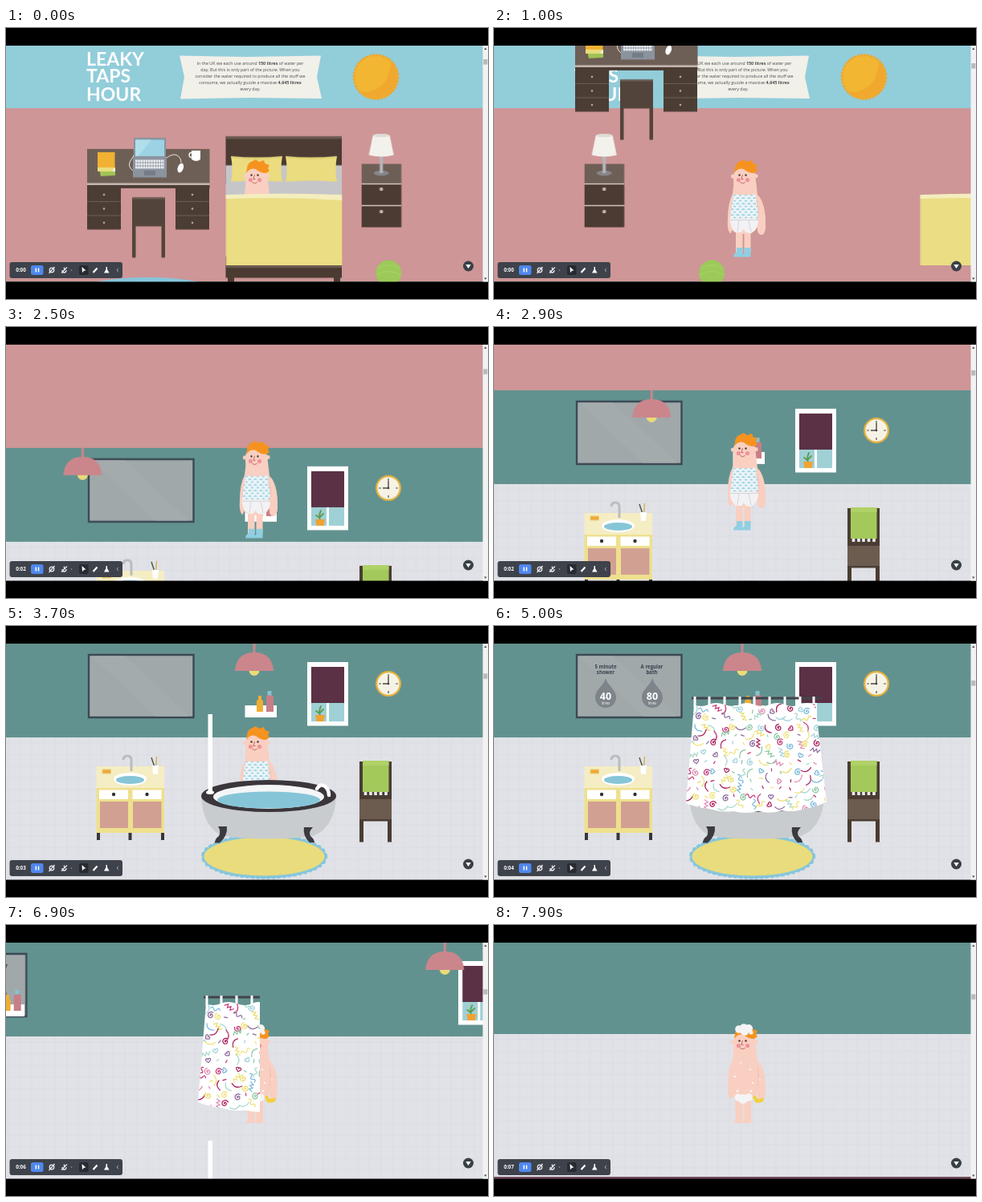
An HTML page that plays this animation: 600x338 px, repeating every 8000 ms.

```html
<!DOCTYPE html>
<html lang="en">
<head>
<meta charset="utf-8">
<title>Water at home</title>
<style>
html, body { margin: 0; width: 100%; height: 100%; overflow: hidden; background: #000; }
svg { display: block; }
#stage { width: 100vw; height: 100vh; }
text { font-family: "Open Sans", "Noto Sans", sans-serif; }
.title text { font-family: Lato, sans-serif; }
.move { animation: 8s linear infinite; }
.b { font-weight: 700; }

.world { animation-name: world; }
@keyframes world {
  0%, 18.1% { transform: none; }
  25% { transform: translateY(-75px); }
  36.25% { transform: translateY(-237px); }
  44%, 92% { transform: translateY(-294px); }
  98.75%, 100% { transform: translateY(-297px); }
}
.desk { animation-name: desk; }
@keyframes desk {
  0% { transform: none; }
  12.5% { transform: translateY(-147px); }
  25%, 100% { transform: translateY(-300px); }
}
.bedside { animation-name: bedside; }
@keyframes bedside {
  0% { transform: none; }
  12.5% { transform: translateX(-330px); }
  18.75%, 100% { transform: translateX(-500px); }
}
.ball { animation-name: ball; }
@keyframes ball {
  0% { transform: none; }
  12.5% { transform: translateX(-205px); }
  23%, 100% { transform: translateX(-520px); }
}
.rug { animation-name: rug; }
@keyframes rug { 0% { transform: none; } 5%, 100% { transform: translateY(20px); } }
.head { animation-name: head; }
@keyframes head { 0% { transform: none; } 12.5%, 100% { transform: translateY(-205px); } }
.foot { animation-name: foot; }
@keyframes foot { 0% { transform: none; } 6%, 100% { transform: translateY(60px); } }
.quilt { animation-name: quilt; }
@keyframes quilt {
  0% { transform: none; }
  12.5% { transform: translateX(257px); }
  16%, 100% { transform: translateX(330px); }
}
.man { animation-name: man; }
@keyframes man {
  0%, 18% { transform: none; }
  25% { transform: translateY(-10px); }
  36.25% { transform: translateY(-32px); }
  41%, 100% { transform: translateY(-39px); }
}
.dry { animation-name: dry; }
@keyframes dry { 0%, 62.4% { opacity: 1; } 62.5%, 100% { opacity: 0; } }
.wet { animation-name: wet; }
@keyframes wet { 0%, 62.4% { opacity: 0; } 62.5%, 100% { opacity: 1; } }

.slide { animation-name: slide; }
@keyframes slide {
  0%, 71.875% { transform: none; }
  80% { transform: translateX(var(--dx)); }
  90%, 100% { transform: translateX(calc(var(--dx) * 2.6)); }
}
.pendant { animation-name: pendant; }
@keyframes pendant {
  0%, 25% { transform: translateX(-340px); }
  36.25% { transform: translateX(-113px); }
  45%, 71.875% { transform: none; }
  80% { transform: translateX(107px); }
  90%, 100% { transform: translateX(315px); }
}
.hand { animation-name: hand; transform-origin: 476px 72px; }
@keyframes hand { 0%, 71.875% { transform: none; } 80%, 100% { transform: rotate(35deg); } }
.mat { animation-name: mat; }
@keyframes mat {
  0%, 71.875% { transform: none; }
  80% { transform: translateY(-170px); }
  87%, 100% { transform: translateY(-310px); }
}
.facts { animation-name: facts; }
@keyframes facts { 0%, 55% { opacity: 0; } 60%, 100% { opacity: 1; } }
.tub { animation-name: tub; }
@keyframes tub {
  0%, 37% { transform: translateY(220px); }
  46%, 71.875% { transform: none; }
  80% { transform: translateY(79px); }
  91%, 100% { transform: translateY(220px); }
}
.reveal { animation-name: reveal; transform-origin: 235px 0; }
@keyframes reveal {
  0%, 46.25% { transform: scaleX(0); }
  56.25%, 71.875% { transform: scaleX(1); }
  80% { transform: scaleX(.739); }
  96%, 100% { transform: scaleX(0); }
}
.thumb { animation-name: thumb; }
@keyframes thumb {
  0% { transform: none; }
  12.5% { transform: translateY(5px); }
  25% { transform: translateY(11.5px); }
  36.25% { transform: translateY(15px); }
  62.5% { transform: translateY(29px); }
  80% { transform: translateY(38px); }
  100% { transform: translateY(48px); }
}
.timer { animation-name: timer; animation-timing-function: step-end; }
@keyframes timer {
  0% { transform: none; }
  16.25% { transform: translateY(-12px); }
  28.75% { transform: translateY(-24px); }
  41.25% { transform: translateY(-36px); }
  53.75% { transform: translateY(-48px); }
  66.25% { transform: translateY(-60px); }
  78.75% { transform: translateY(-72px); }
  91.25%, 100% { transform: translateY(-84px); }
}
</style>
</head>
<body>
<svg id="stage" viewBox="0 0 600 338" preserveAspectRatio="none">
<defs>
  <pattern id="tiles" width="14.5" height="14.5" patternUnits="userSpaceOnUse">
    <path fill="#e1e2e7" d="M0 0h14.5v14.5H0z"/>
    <path d="M3 0v14.5M0 5h14.5" stroke="#d8dae0" stroke-width=".7"/>
  </pattern>
  <pattern id="clouds" width="7" height="7" patternUnits="userSpaceOnUse">
    <path fill="#eaf3f6" d="M0 0h7v7H0z"/>
    <path d="M.5 2.5q1.8-2.4 3.8 0zM4 6q1.5-2.4 3 0z" fill="#8fcfe4" stroke="#8fcfe4" stroke-width=".6"/>
  </pattern>
  <clipPath id="open"><rect class="move reveal" x="235" y="80" width="180" height="160"/></clipPath>
  <clipPath id="cloth"><path id="sheet" d="M249 98Q258 102 267 98T287 98T306 98T324 98T343 98T362 98T381 98T400 98L414 219Q402 226 390 227Q374 233 358 230Q345 235 329 231Q313 235 298 231Q283 233 268 228Q254 227 239 221Z"/></clipPath>
  <g id="pillow">
    <path d="M280 160Q312 163 344 160Q341 176 344 192Q312 189 280 192Q283 176 280 160Z" fill="#eadc7f"/>
    <path d="M282 162Q312 165 342 162" fill="none" stroke="#d8c96d" stroke-width=".8"/>
  </g>
  <g id="drawers">
    <path fill="#4b3d34" d="M101 199h42v52.5h-42z"/>
    <path d="M101 216.5h42M101 234h42" stroke="#7a6a60" stroke-width=".8"/>
    <g fill="#b9aaa0"><circle cx="122" cy="208" r="1.3"/><circle cx="122" cy="225.5" r="1.3"/><circle cx="122" cy="243" r="1.3"/></g>
  </g>
  <path id="drop" d="M139 65C141 74 152 79 152 89A13 13 0 0 1 126 89C126 79 137 74 139 65Z" fill="#7d848a"/>
</defs>

<path fill="#ce9697" d="M0 0h600v338H0z"/>

<g class="move world">
  <path fill="#ce9697" d="M0 100h600v216H0z"/>
  <path fill="#92cdda" d="M0 0h600v100H0z"/>
  <path fill="#62928f" d="M0 316h600v118H0z"/>
  <path fill="url(#tiles)" d="M0 433h600v178H0z"/>
  <path fill="#714a5b" d="M0 611h600v30H0z"/>

  <g class="title" fill="#fff" font-size="23" font-weight="700">
    <text x="100" y="46.5">LEAKY</text>
    <text x="100" y="68">TAPS</text>
    <text x="100" y="90.5">HOUR</text>
  </g>
  <path fill="#f1f0e9" d="M216 34.5L300 36L392 34.5L387 61L393 88L304 87L217 88.5L222 61Z"/>
  <g font-size="5.4" fill="#4b4b50" text-anchor="middle">
    <text x="304" y="46">In the UK we each use around <tspan class="b">150 litres</tspan> of water per</text>
    <text x="304" y="54">day. But this is only part of the picture. When you</text>
    <text x="304" y="62">consider the water required to produce all the stuff we</text>
    <text x="304" y="70.2">consume, we actually guzzle a massive <tspan class="b">4,645 litres</tspan></text>
    <text x="304" y="78.3">every day.</text>
  </g>
  <circle cx="460.5" cy="61" r="27.5" fill="#f2b632" stroke="#eea62c" stroke-width="2.6" stroke-dasharray="3 1.3"/>
  <path d="M479 41A27 27 0 0 1 441 80Q477 81 479 41Z" fill="#f0a92e"/>

  <g transform="translate(0 294)">
    <g class="move slide" style="--dx:-104px">
      <path fill="#a0a8aa" stroke="#3b4a55" stroke-width="2.4" d="M103 36h130.5v78H103z"/>
      <path fill="#a9b0b1" d="M106 37h42l80 76h-42z" opacity=".5"/>
      <g class="move facts" text-anchor="middle">
        <g fill="#37444f" font-size="6.1" font-weight="700">
          <text x="139" y="52.5">5 minute</text><text x="139" y="60">shower</text>
          <text x="196.5" y="52.5">A regular</text><text x="196.5" y="60">bath</text>
        </g>
        <use href="#drop"/><use href="#drop" x="58"/>
        <g fill="#fff" class="b" font-size="12.5"><text x="139" y="92">40</text><text x="197" y="92">80</text></g>
        <g fill="#fff" font-size="4.6"><text x="139" y="97.5">litres</text><text x="197" y="97.5">litres</text></g>
      </g>
    </g>

    <g class="move slide" style="--dx:94px">
      <path fill="#fff" d="M375 45h51v79.5h-51z"/>
      <path fill="#9fd0d6" d="M380 51h41v68h-41z"/>
      <path fill="#fff" d="M399 96h3v23h-3z"/>
      <path fill="#5a3145" d="M380 51h41v45h-41z"/>
      <path d="M391 112q-2-6 1-12M390 109l-4-3M391 108l4-4" fill="none" stroke="#5d9b4c" stroke-width="1.8" stroke-linecap="round"/>
      <path fill="#f0a232" d="M385 111h12l-1.5 8h-9z"/>
    </g>

    <g class="move slide" style="--dx:103px">
      <circle cx="476" cy="72" r="14.8" fill="#f6f3e6" stroke="#e5b23e" stroke-width="2.3"/>
      <path d="M476 60v3M476 81v3M464 72h3M485 72h3" stroke="#55504a" stroke-width="1.2"/>
      <path d="M476 72h-7" stroke="#3f3c3a" stroke-width="1.4"/>
      <path class="move hand" d="M476 72v-9" stroke="#3f3c3a" stroke-width="1.3"/>
      <circle cx="476" cy="72" r="1.3" fill="#3f3c3a"/>
    </g>

    <g class="move slide" style="--dx:-157px">
      <path fill="#fff" d="M297.5 99H337v15h-39.5z"/>
      <path fill="#f2ad31" d="M312 93q4-3 8 0v14h-8z"/><path fill="#f2ad31" d="M314 87h4v5h-4z"/>
      <path fill="#c77f86" d="M324 89q0-3 3-3h3q3 0 3 3v18h-9z"/><path fill="#86c2d0" d="M325.5 81h5v5.5h-5z"/>
    </g>

    <g class="move pendant">
      <circle cx="309" cy="55.5" r="6.5" fill="#eadb78"/>
      <path fill="#cb868c" d="M307.5 22h3v11q21 1 22.500 23h-48q1.500-22 22.500-23z"/>
    </g>

    <g class="move slide" style="--dx:-107px">
      <path fill="#f5edc3" d="M112.5 175h84.5v27h-84.5z"/>
      <path fill="#eee08e" d="M112.5 202h84.5v56h-84.5z"/>
      <path fill="#f0a83a" stroke="#e6cf78" d="M120 179h10.5v5h-10.5z"/>
      <ellipse cx="154.500" cy="191" rx="20.500" ry="8" fill="#fff"/>
      <ellipse cx="154.500" cy="192" rx="17.500" ry="5" fill="#86c5d8"/>
      <path d="M156 181V167q0-5-5-5t-5 5" fill="none" stroke="#b9bcc0" stroke-width="3"/>
      <path d="M185 176l-4-12" stroke="#4b5a44" stroke-width="1.5"/>
      <path d="M186.500 176l1-13" stroke="#d2b04a" stroke-width="1.4"/>
      <path fill="#fff" d="M182 174h8l-1 11h-6z"/>
      <path fill="#fff" d="M116 204.5h36v11.5h-36zM157.5 204.5h36v11.5h-36z"/>
      <path fill="#d2a093" d="M117 219h35v33h-35zM158 219h35.5v33H158z"/>
      <circle cx="134" cy="210" r="2.2" fill="#333"/><circle cx="175.5" cy="210" r="2.2" fill="#333"/>
      <path fill="#37363a" d="M113 258h4v9h-4zM152.5 258h4v9h-4zM193 258h4v9h-4z"/>
    </g>

    <g class="move slide" style="--dx:107px">
      <path fill="#4a3c33" d="M440 169h40v100.500h-5v-26h-30v26h-5z"/>
      <path d="M447.500 206v5M454 206v5M460 206v5M466.500 206v5M473 206v5" stroke="#eceded" stroke-width="3.600"/>
      <path fill="#6c5c50" d="M440 216h40v25h-40z"/>
      <path fill="#a3c95a" d="M444 168h32.5v39H444z"/><path fill="#b0d166" d="M444 168h32.5v6H444z"/>
    </g>

    <g class="move mat">
      <ellipse cx="321.5" cy="287.500" rx="75" ry="24.5" fill="none" stroke="#86c6dc" stroke-width="7.500" stroke-dasharray="0 6.500" stroke-linecap="round"/>
      <ellipse cx="321.5" cy="287.500" rx="75" ry="24" fill="#e9dc7d"/>
    </g>
  </g>
</g>

<ellipse class="move rug" cx="176" cy="328" rx="84" ry="17" fill="#86c6dc"/>

<g class="move head">
  <path fill="#4b3b33" d="M273.5 135.5H418V195H273.5z"/>
  <path fill="#6d5c52" d="M273.5 135.5H418v3H273.5z"/>
  <path fill="#c6c6c9" d="M273.5 171.5H418V212H273.5z"/>
  <use href="#pillow"/><use href="#pillow" x="68"/>
</g>
<g class="move foot">
  <path fill="#4b3b33" d="M273.5 285H418v26.5H273.5zM276 311h8v10h-8zM408 311h8v10h-8z"/>
  <path fill="#6d5c52" d="M273.5 296H418v3H273.5z"/>
</g>

<g class="move desk">
  <path fill="#6e5f56" d="M101 151h152.5v43H101z"/>
  <path fill="#4b3d34" d="M101 196h152.5v4H101z"/>
  <path fill="#c9bcb4" d="M101 193.5h152.5v2.5H101z"/>
  <use href="#drawers"/><use href="#drawers" x="110"/>
  <path fill="#53443b" d="M157 211.5h41v36h-41zM157 247h4.5v39.5H157zM193.5 247h4.5v39.5h-4.5z"/>
  <path d="M157 212.5h41" stroke="#6e5f56" stroke-width="2"/>
  <path fill="#a0c455" d="M116 176l20-1v9l-18 1z"/><path fill="#f4f0dd" d="M114 174h22v5h-22z"/>
  <path fill="#f1b133" d="M114 155h21.5v20H114z"/><path fill="#e9dc7d" d="M114 174h21l-3 5h-18z"/>
  <path d="M158 178q-8-6-2-14t3-12M200 162q8-6 13-3t5 9" fill="none" stroke="#f1e9dc" stroke-width="1"/>
  <path fill="#8b939f" d="M159 137h40v25h-40z"/><path fill="#9bd3e4" d="M161 139.5h36v20.5h-36z"/>
  <path fill="#b0dfeb" d="M161 139.5h20l-16 20.5h-4z"/>
  <path fill="#8b939f" d="M158 161h42v25.5h-42z"/>
  <path d="M161 166h36M161 170h36M161 174h36" stroke="#f0f2f5" stroke-width="3" stroke-dasharray="2.6 .6"/>
  <path fill="#757d89" d="M172 178h14v6h-14z"/>
  <ellipse cx="217.5" cy="174.5" rx="3.5" ry="6" fill="#fff" transform="rotate(20 217 174)"/>
  <path fill="#fff" d="M231 153h11v11q-5 4-11 0z"/><circle cx="231" cy="158.5" r="3" fill="none" stroke="#fff" stroke-width="1.3"/>
</g>

<g class="move ball">
  <circle cx="476.5" cy="305.5" r="16" fill="#9bca59"/>
  <path d="M463 300q13-9 27 0M462 308q14-9 29 0" fill="none" stroke="#a5d064" stroke-width="1.5"/>
</g>

<g class="move bedside">
  <path fill="#6e5f56" d="M443 169.5h49.5V194H443z"/>
  <path fill="#4b3b33" d="M443 194h49.5v54.5H443z"/>
  <path d="M443 194.5h49.5M443 221.5h49.5" stroke="#cfc3bb" stroke-width="1.3"/>
  <circle cx="467.5" cy="201" r="2.3" fill="#c3b5ab"/><circle cx="467.5" cy="229" r="2.3" fill="#c3b5ab"/>
  <ellipse cx="467.5" cy="181" rx="9.5" ry="3.2" fill="#85868a"/>
  <path fill="#b4b6b9" d="M465.5 158h4v23h-4z"/>
  <path fill="#f3f1ec" d="M457 134q10-4 21 0l5 24.5q-15 4-31 0z"/>
  <ellipse cx="467.5" cy="134" rx="10.5" ry="2" fill="#dedbd5"/>
</g>

<g class="move man">
  <g fill="#f9cfc1">
    <circle cx="297.5" cy="185" r="2.6"/><circle cx="326" cy="184.5" r="2.6"/>
    <path d="M301 250h8.5v30H301zM311.5 250h8v30h-8z"/>
    <path d="M298 184Q299 173 312 173Q325 173 325.5 186L328 208Q338 217 338 245Q338 258 332.5 258Q327 257 328 248Q324 257 312 257Q300 257 296 252Q295 258 293 255Q290 250 291 238Q291 218 297 207Q299 196 298 184Z"/>
  </g>
  <g class="move dry">
    <path fill="url(#clouds)" d="M298 207.5Q312 209 325.5 207.5L330 237.5H294z"/>
    <path fill="#f2f2f4" d="M293.5 237.5H330Q329 251 320 256L313 255L311 251L308 255L301 255Q294 250 293.5 237.5Z"/>
    <path d="M294 239.5h35.5M305 240l-2 14M317 240l3 14" stroke="#cdced4" stroke-width=".8" fill="none"/>
    <path fill="#f9cfc1" d="M326 208Q338 217 338 245Q338 258 332.5 258Q327 257 328.5 246Q331 228 326 208Z"/>
    <path fill="#8fcfe4" d="M302 274h7.5v11.5H298q0-4 4-6zM311.5 274h8v11.5H309q0-4 3-5z"/>
  </g>
  <path fill="#f6931f" d="M299 181L300.5 172L303 168L307 166L311 164L315 167L321 165L322.5 169L328 171L326 175L328 178L324 181Q316 181 311 176Q304 174 299 181Z"/>
  <path d="M328 240Q331 228 327.5 216" fill="none" stroke="#efb9ab" stroke-width=".7"/>
  <circle cx="304.5" cy="189.5" r="2.6" fill="#f0929a"/><circle cx="315.5" cy="189.5" r="2.6" fill="#f0929a"/>
  <circle cx="305.5" cy="183.5" r="1.2" fill="#4a3832"/><circle cx="313.5" cy="183.5" r="1.2" fill="#4a3832"/>
  <path d="M309.5 183l-1.5 5.5h2.5M306.500 192.5q3 2.5 6 0" fill="none" stroke="#c06a5c" stroke-width="1"/>
  <g class="move wet" fill="#f4f4f6">
    <circle cx="305" cy="169" r="4.8"/><circle cx="311" cy="167" r="4.8"/><circle cx="317" cy="168" r="5"/><circle cx="312" cy="172" r="5"/>
    <circle cx="320" cy="173" r="2.6"/>
    <path fill="#f9cfc1" d="M300 256h9.5v30H299q0-3 2-4zM311.5 256h8.5v30h-10q0-3 1.500-4z"/>
    <circle cx="304" cy="254" r="4.5"/><circle cx="310" cy="256" r="6"/><circle cx="317" cy="254" r="4.8"/>
    <g><circle cx="300" cy="228" r="1.3"/><circle cx="319" cy="219" r="1.2"/><circle cx="322" cy="236" r="1.3"/><circle cx="303" cy="246" r="1.6"/><circle cx="331" cy="232" r="1"/><circle cx="307" cy="211" r="1"/><circle cx="320" cy="246" r="1.5"/></g>
    <path fill="#f1cf3d" d="M322 254q3-2 4 1q5 2 9-1q2 6-4 6.500q-8 1-7-4z"/><circle cx="324.5" cy="254" r="2.3" fill="#f1cf3d"/>
  </g>
</g>

<g class="move quilt">
  <path fill="#eadd84" d="M273.5 209H418v87H273.5z"/>
  <path fill="#f4edbd" d="M273.5 208Q346 205 418 208V215Q346 210 273.5 213Z"/>
</g>

<g class="move tub">
  <path fill="#c9ccce" d="M243 212H411Q409 252 382 262Q327 269 270 262Q245 252 243 212Z"/>
  <path fill="#3a3a40" d="M264 250H275Q276 262 266 270.500H260Q260 265 265 262Q268 256 264 250ZM371 251H382Q376 257 379 262Q384 266 384 270H378Q369 262 371 251Z"/>
  <ellipse cx="327" cy="212" rx="84" ry="20" fill="#3a363b"/>
  <ellipse cx="327" cy="213" rx="69" ry="15" fill="#f4f5f6"/>
  <ellipse cx="327" cy="217" rx="64" ry="10.5" fill="#86c5d8"/>
  <path d="M387 203q4-7 10-3q5 4 5 11" fill="none" stroke="#fff" stroke-width="4.5" stroke-linecap="round"/>
  <path fill="#fff" d="M251.5 110h5.5v98h-5.5z"/><ellipse cx="254" cy="207.5" rx="5" ry="2.5" fill="#fff"/>
</g>

<g clip-path="url(#open)">
  <path fill="#43454c" d="M246 88.5h162v3H246z"/>
  <use href="#sheet" fill="#fff"/>
  <path d="M250 88v13M268 88v13M287 88v13M306 88v13M324 88v13M343 88v13M362 88v13M381 88v13M398 88v13" stroke="#fff" stroke-width="3"/>
  <g id="print" clip-path="url(#cloth)" fill="none" stroke-width="1.25" stroke-linecap="round"></g>
</g>

<path d="M0 0h600v22H0zM0 316.5h600V338H0z"/>
<path fill="#f2f2f2" d="M593.5 22h6.5v294.5h-6.5z"/>
<path fill="#555" d="M595 27l1.8-2.5 1.8 2.5zM595 311.5l1.8 2.5 1.8-2.5z"/>
<path class="move thumb" fill="#b9b9bb" d="M594.3 39h5v6.5h-5z"/>

<rect x="4.5" y="292" width="140.5" height="20" rx="3" fill="#3e424a"/>
<svg x="8" y="296" width="22" height="12" overflow="hidden"><g id="clock" class="move timer" fill="#fff" font-size="6.3" font-weight="700" text-anchor="middle"></g></svg>
<rect x="31" y="296" width="15.5" height="12" rx="2.5" fill="#4f87ee"/>
<path d="M37.3 299.5v5M40.5 299.5v5" stroke="#fff" stroke-width="1.5"/>
<g fill="none" stroke="#e6e7ea" stroke-width="1.3">
  <circle cx="57" cy="302" r="2.8"/><path d="M53.5 306l7-8"/>
  <path d="M72.5 298.5v4M70 302q0 3 2.5 3t2.5-3M69 305.5l7-7"/>
</g>
<circle cx="81.5" cy="302" r=".8" fill="#999da5"/>
<rect x="91" y="296" width="11.5" height="12" rx="2" fill="#272a30"/>
<path fill="#fff" d="M94.5 298l5 4.5-2.5.3-2 2.4z"/>
<path d="M108.5 305l5-5.5" stroke="#fff" stroke-width="2.2"/>
<path fill="#fff" d="M124.5 298h1.5v3l2.5 4.5h-6.5l2.5-4.5z"/>
<path d="M140 299.8l-2 2.2 2 2.2" fill="none" stroke="#a6a9b0"/>
<circle cx="575.5" cy="297" r="6.5" fill="#3a3f47"/>
<path fill="#fff" d="M572.3 295h6.4l-3.2 5z"/>
</svg>
<script>
const NS = 'http://www.w3.org/2000/svg';

function add(parent, tag, attrs) {
  const el = document.createElementNS(NS, tag);
  for (const key in attrs) el.setAttribute(key, attrs[key]);
  return parent.appendChild(el);
}

const clock = document.getElementById('clock');
for (let s = 0; s < 8; s++) add(clock, 'text', { x: 10.5, y: 8.3 + 12 * s }).textContent = '0:0' + s;

// Confetti print on the curtain: one doodle per jittered grid cell
let seed = 11;
const rnd = () => (seed = seed * 16807 % 2147483647) / 2147483647;
const pick = list => list[Math.floor(rnd() * list.length)];

function spiral() {
  let d = 'M0 0';
  for (let a = 0; a < 11; a += .6) d += `L${(a * .42 * Math.cos(a)).toFixed(1)} ${(a * .42 * Math.sin(a)).toFixed(1)}`;
  return d;
}
const doodles = [
  'M-6 1l2.5-4 2 4 2.5-4 2 4 2.5-4',
  'M-7 0q2-4 4 0t4 0t4 0',
  'M-2 0h4', 'M-1.5 0h3', 'M-6 3q8 1 10-8', 'M-5-4q0 8 9 8',
  'M0 3q-5-4-2-5q1.500-.5 2 1q.5-1.500 2-1q3 1-2 5', spiral(), spiral()
];
const inks = ['#a8205c', '#b3205f', '#c43a78', '#de8db4', '#79b9da', '#a4d3dc', '#a9d8cb', '#f0e27a', '#ecdc6b', '#8cc7a4', '#8d6a9c'];
const print = document.getElementById('print');
for (let y = 104; y < 236; y += 11) {
  for (let x = 240; x < 418; x += 11.5) {
    const px = (x + rnd() * 7 - 3).toFixed(1), py = (y + rnd() * 6 - 3).toFixed(1);
    add(print, 'path', {
      d: pick(doodles), stroke: pick(inks),
      transform: `translate(${px} ${py}) rotate(${Math.floor(rnd() * 180 - 90)})`
    });
  }
}
</script>
</body>
</html>
```
